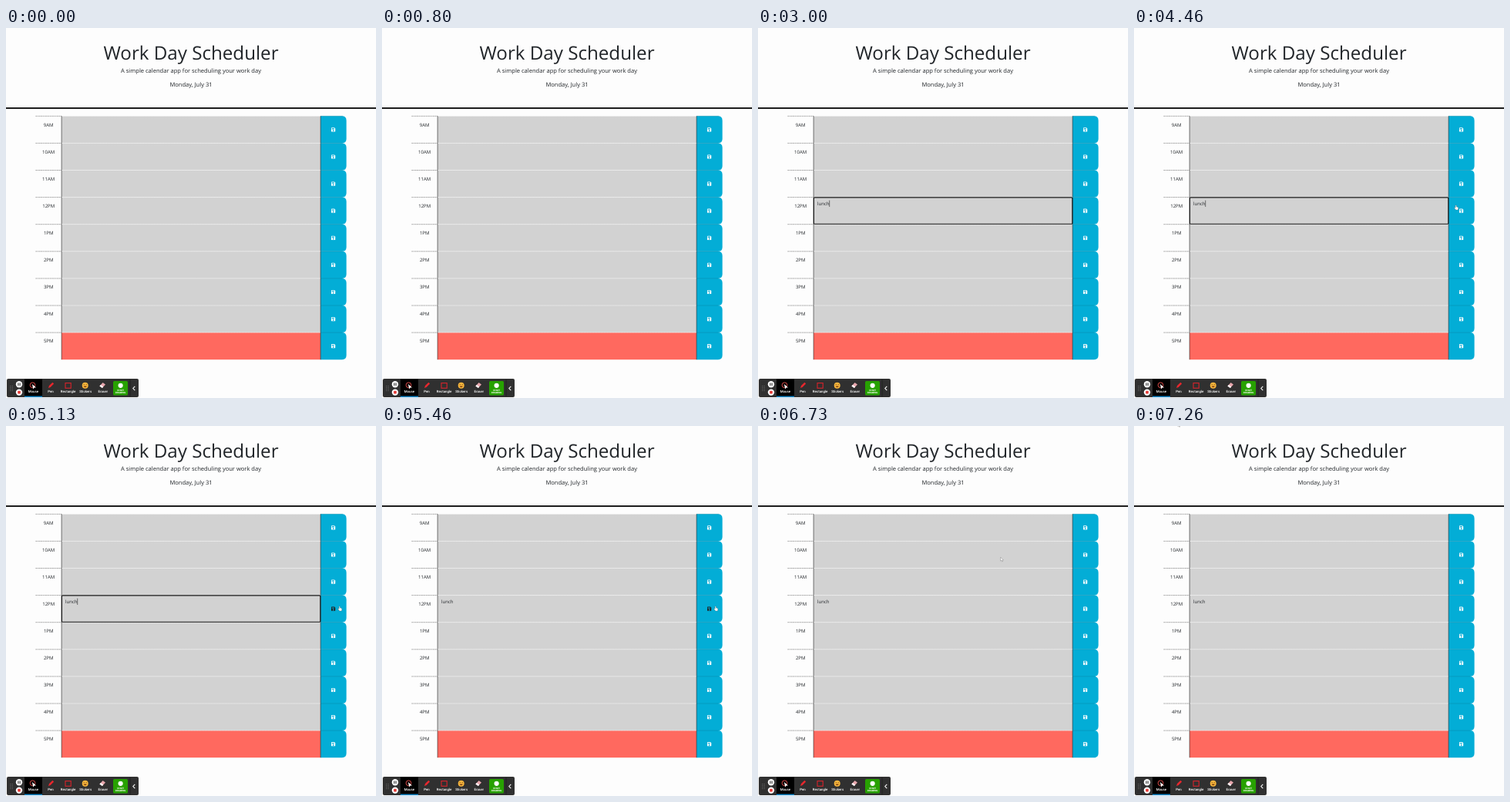
An HTML page for the animation above (8 s loop, 480 by 480 pixels).

```html
<!DOCTYPE html>
<html lang="en">
<head>
<meta charset="utf-8">
<title>Day planner</title>
<style>
html, body { margin: 0; width: 100%; height: 100%; overflow: hidden; background: #fdfdfd; }
svg { display: block; width: 100vw; height: 100vh; }
text { font-family: "Open Sans", "Noto Sans", sans-serif; fill: #212529; text-rendering: geometricPrecision; }
.mid { text-anchor: middle; }
.bar text { font-family: Roboto, Inter, sans-serif; font-size: 4.4px; font-weight: 500; fill: #fff; }
</style>
</head>
<body>
<svg viewBox="0 0 480 480">
  <defs>
    <g id="disk">
      <path d="M-2.6-2.1q0-.5.5-.5H1.5L2.6-1.5V2.1q0 .5-.5.5H-2.1q-.5 0-.5-.5zM-1.8-1.8V-.4H1.1V-1.8zM0 .3a.85.85 0 1 0 .01 0z" fill-rule="evenodd"/>
    </g>
  </defs>
  <rect width="480" height="480" fill="#fdfdfd"/>
  <g class="mid">
    <text x="240" y="41.4" font-size="24.16">Work Day Scheduler</text>
    <text x="240" y="58.3" font-size="7.55">A simple calendar app for scheduling your work day</text>
    <text x="240" y="75.6" font-size="7.55">Monday, July 31</text>
  </g>
  <rect y="103" width="480" height="1.9" fill="#111"/>
  <g id="rows"></g>
  <g id="entry">
    <rect id="focus" x="72.4" y="219.9" width="335.4" height="34.4" rx="1" fill="none" stroke="#151515" stroke-width="1.1"/>
    <text id="note" x="77" y="230.3" font-size="6.04"></text>
    <rect id="caret" y="223.6" width=".6" height="8.4" fill="#222"/>
  </g>
  <g class="bar">
    <rect x="1" y="455" width="171" height="24" rx="2" fill="#303030"/>
    <path d="M5.8 464v7M8.2 464v7" stroke="#888" stroke-width=".8" stroke-dasharray=".9 1.1"/>
    <circle cx="17" cy="462.2" r="4.2" fill="#fff"/>
    <path d="M15.9 460.4v3.6M18.1 460.4v3.6" stroke="#222" stroke-width="1"/>
    <circle cx="17" cy="472.6" r="4.2" fill="#fff"/>
    <rect x="15.2" y="470.8" width="3.6" height="3.6" rx=".6" fill="#e53935"/>
    <rect x="24" y="455.5" width="23" height="23" fill="#000"/>
    <rect x="24" y="477.5" width="23" height="1.6" fill="#1687c9"/>
    <circle cx="34.5" cy="463.3" r="3.4" fill="none" stroke="#ef5350" stroke-width=".9"/>
    <path d="M34 462l5 4.4-2.4.2-1.4 2z" fill="#fff"/>
    <path d="M55 467l1-3 4.4-4.2 1.7 1.7-4.4 4.4z" fill="#e8272e"/>
    <rect x="77" y="460.6" width="7.2" height="6.6" fill="none" stroke="#d8232b" stroke-width="1.1"/>
    <circle cx="102.7" cy="463.8" r="4" fill="#f6b53c"/>
    <path d="M100.4 464.5q2.3 3.6 4.6 0z" fill="#7a3d10"/>
    <path d="M101.2 462v1M104.2 462v1" stroke="#59300d" stroke-width=".8"/>
    <path d="M121.4 464.5l4.2-4.4 3.4 2.5-4.2 4.4z" fill="#e9a7ae"/>
    <path d="M121.4 464.5l1.5-1.6 3.4 2.5-1.5 1.6z" fill="#fff"/>
    <g id="tools" class="mid"></g>
    <rect x="139" y="458" width="19" height="18.5" rx="1.5" fill="#27a100"/>
    <circle cx="148.6" cy="463.8" r="3.1" fill="#fff"/>
    <g class="mid">
      <text x="148.6" y="471.3" style="font-size:3px;font-weight:700">START</text>
      <text x="148.6" y="474.4" style="font-size:3px;font-weight:700">DRAWING</text>
    </g>
    <path d="M161 456v22" stroke="#1d1d1d" stroke-width=".8"/>
    <path d="M167.3 464.8l-2.5 2.7 2.5 2.7" fill="none" stroke="#fff" stroke-width="1.1"/>
  </g>
  <circle id="ring" r="12" fill="none" stroke="#ea6b6e" stroke-width="1.6"/>
  <g id="hand">
    <path d="M-1.1-2.9q.7-.6 1.2.1l.2 1.8 1.7.5q.7.3.6 1.1L2.2 2.9H-.5L-2.4.6q-.2-.8.6-.8l.8.5z" fill="#fff" stroke="#444" stroke-width=".3"/>
  </g>
  <g id="arrow">
    <path d="M-1.6-2.8V2.1L-.5 1.1.3 2.9 1.2 2.5.4.8H1.9z" fill="#fff" stroke="#777" stroke-width=".45"/>
  </g>
</svg>
<script>
const $ = id => document.getElementById(id);
const LOOP = 8000, TOP = 114.3, ROW = 35.1, TICK = 1000 / 15;
const hours = ["9AM", "10AM", "11AM", "12PM", "1PM", "2PM", "3PM", "4PM", "5PM"];

$("rows").innerHTML = hours.map((hour, i) => {
  const y = TOP + i * ROW;
  return `<path d="M38.5 ${y}H72" stroke="#555" stroke-width=".6" stroke-dasharray="1.5 .8"/>
    <text class="mid" x="55.2" y="${y + 13.2}" font-size="6.04">${hour}</text>
    <rect x="72" y="${y}" width="336" height="${ROW}" fill="${i < 8 ? "#d2d2d2" : "#ff695f"}"/>
    <path d="M72 ${y}H408" stroke="#fafafa" stroke-width=".6" stroke-dasharray="1.5 .5"/>
    <path d="M408 ${y}h28q5.6 0 5.6 5.6v${ROW - 11.2}q0 5.6-5.6 5.6h-28z" fill="#03add6"/>
    <path d="M408 ${y}h29" stroke="#087f9d" stroke-width=".4"/>
    <path d="M72.1 ${y}v${ROW}M408.1 ${y}v${ROW}" stroke="#333" stroke-width=".65"/>
    <use id="icon${i}" href="#disk" x="424.6" y="${y + 17.6}" fill="#fff"/>`;
}).join("");

$("tools").innerHTML = ["Mouse", "Pen", "Rectangle", "Stickers", "Eraser"]
  .map((name, i) => `<text x="${35.4 + i * 22.6}" y="473.2">${name}</text>`).join("");

const keys = [2530, 2730, 2800, 2930, 3000];
const path = [
  [4460, 418, 233], [4800, 425, 235], [5130, 433.2, 237], [5800, 433.2, 237],
  [6200, 459.5, 254], [6590, 459.5, 254], [6930, 120, 62], [7120, 120, 62], [7260, 58.5, -1.6]
];

function pointer(t) {
  const n = path.findIndex(p => p[0] > t);
  if (n < 0) return path[path.length - 1].slice(1);
  const [a, ax, ay] = path[Math.max(0, n - 1)], [b, bx, by] = path[n];
  const k = Math.max(0, (t - a) / (b - a));
  return [ax + (bx - ax) * k, ay + (by - ay) * k];
}

const show = (id, on) => $(id).setAttribute("visibility", on ? "visible" : "hidden");
const within = (t, a, b) => t >= a && t < b;

function draw(time) {
  // the screen refreshes 15 times a second
  const t = Math.floor((time + 7) / TICK) * TICK;
  const typed = keys.filter(k => t >= k).length;
  const focused = within(t, 1460, 5330);
  $("note").textContent = "lunch".slice(0, typed);
  const width = typed ? $("note").getComputedTextLength() : 0;
  $("caret").setAttribute("x", 77 + width);
  show("focus", focused);
  const since = t - (typed ? keys[typed - 1] : 1460);
  const lit = Math.floor(since / 531) % 2 === 0 || within(t, 2460, 2530);
  show("caret", focused && lit);

  const [x, y] = pointer(t);
  const over = x < 441 && t < 6500;
  for (const id of ["hand", "arrow"]) $(id).setAttribute("transform", `translate(${x} ${y})`);
  show("hand", t >= 4460 && over);
  show("arrow", t >= 4460 && !over);

  const shade = over ? Math.min(1, Math.max(0, (t - 4470) / 300)) : 0;
  const tone = Math.round(255 - 222 * shade);
  $("icon3").setAttribute("fill", `rgb(${tone},${tone},${tone})`);

  show("ring", within(t, 5260, 5460) || within(t, 6200, 6460));
  $("ring").setAttribute("cx", x);
  $("ring").setAttribute("cy", y - 1.6);
}

const start = performance.now();
function frame() {
  draw((performance.now() - start) % LOOP);
  requestAnimationFrame(frame);
}
frame();
</script>
</body>
</html>
```
